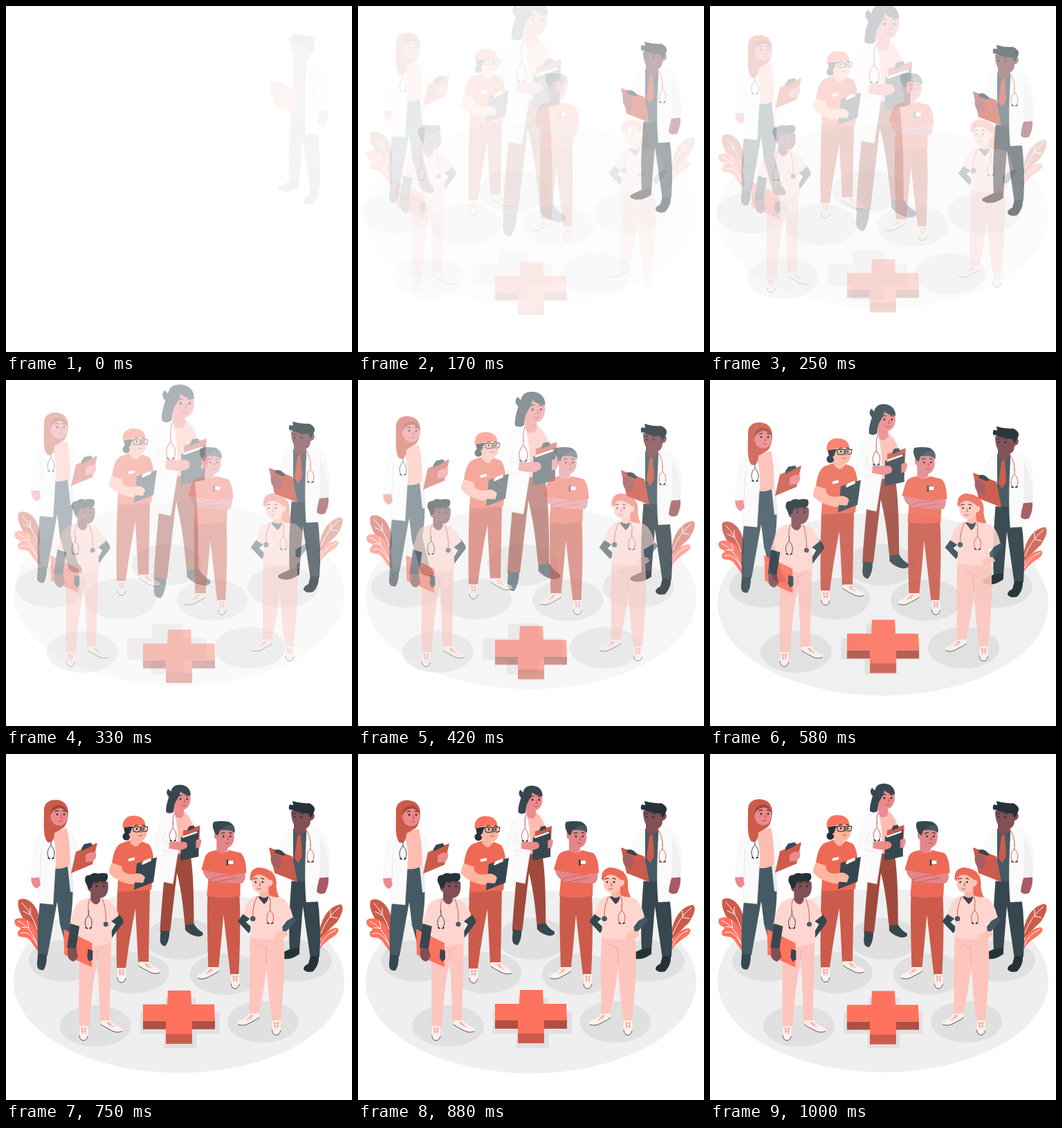
An HTML page for the animation above (1040 ms loop, 500x500 px).

```html
<!DOCTYPE html>
<html lang="en">
<head>
<meta charset="utf-8">
<title>Medical team</title>
<style>
html, body { margin: 0; width: 100%; height: 100%; overflow: hidden; background: #fff; }
svg { display: block; width: 100vw; height: 100vh; }
.line { fill: none; stroke-linecap: round; stroke-linejoin: round; }
.red { fill: #ff725e; } .mid { fill: #ee6a56; } .brick { fill: #cc5b4b; } .rust { fill: #a04a3e; }
.pink { fill: #ffd6cf; } .rose { fill: #fdc5bd; } .blush { fill: #ffbdb1; }
.slate { fill: #455a64; } .dark { fill: #37474f; } .black { fill: #263238; }
.coat { fill: #fafafa; stroke: #ebebeb; stroke-width: .6; } .shade { fill: #ebebeb; }
.brown { fill: #7f5054; } .umber { fill: #a55c64; } .warm { fill: #ec8a8c; } .tan { fill: #e4868b; } .fair { fill: #ffb5a0; }
</style>
</head>
<body>
<svg viewBox="0 0 500 500">
<defs>
  <g id="face">
    <ellipse rx="1.3" ry="1.6" class="black"/><ellipse cx="10" rx="1.3" ry="1.6" class="black"/>
    <path class="line" stroke="#263238" stroke-width="1.1" d="M-3-4Q-1-6 2-5M8-5Q10-6 12-4"/>
    <path class="line" stroke="#a04a3e" stroke-width=".9" d="M6 1L7 5H5M2 9Q5 12 8 9"/>
  </g>
  <g id="front">
    <path fill="#fff0ed" d="M0 0H12V16Q10 22 5 21Q0 20 0 15Z"/>
    <path class="line" stroke="#37474f" stroke-width=".9" d="M0 14Q0 20 5 21Q10 22 12 15"/>
    <path class="line" stroke="#e8644f" stroke-width=".7" d="M4 4H8M4 8H8M3 2L4 11M9 2L8 11"/>
  </g>
  <g id="side">
    <path fill="#fff0ed" d="M0-1H14Q18 6 28 9Q33 12 30 15Q22 18 14 13Q4 8 0 5Z"/>
    <path class="line" stroke="#37474f" stroke-width=".9" d="M0 5Q4 8 14 13Q22 18 30 15"/>
    <path class="line" stroke="#e8644f" stroke-width=".7" d="M9 3L13 2M11 6L15 4M10 2Q12 6 18 8"/>
  </g>
  <g id="scope" class="line">
    <path d="M0-13V-6C-6 0-6 7-3 12M0-6C6 0 6 7 3 12"/>
    <path stroke="#263238" stroke-width="1.8" d="M-4 12L-2 13M4 12L2 13"/>
  </g>
</defs>

<g data-from="0,-30"><ellipse cx="250" cy="327" rx="239" ry="132.5" fill="#efefef"/></g>

<g data-from="-30,0" id="shadows" fill="#e0e0e0">
  <path d="M229 352H273V373H307V404H274V425H227V404H193V373H229Z"/>
</g>

<g data-from="0,-30">
  <path class="brick" d="M46 264C30 246 14 225 18 210C27 203 51 214 49 252Z"/>
  <path class="red" d="M47 284C38 275 36 266 29 264C22 262 18 265 17 258C17 253 22 253 21 250C13 248 11 242 13 238C20 233 32 236 40 246L48 262L50 285Z"/>
  <path class="line" stroke="#fff" d="M23 214Q36 226 45 252M25 226L35 231L35 221M17 240Q34 246 45 273M23 249L33 250L31 240M21 258Q34 252 46 276"/>
</g>
<g data-from="0,-30">
  <path class="brick" d="M452 266C453 240 464 220 483 216C490 218 486 230 478 242Q467 252 452 268Z"/>
  <path class="red" d="M451 286C452 268 458 254 476 250C484 250 480 258 474 262C465 268 456 274 451 286Z"/>
  <path class="line" stroke="#fff" d="M482 220Q464 234 455 258M469 225V234L479 236M477 253Q460 260 454 276"/>
</g>

<g data-from="0,-30" data-quick>
  <path class="dark" d="M413 178L436 178L450 205Q456 250 453 293L440 296L429 220L424 284L410 284C408 250 410 215 413 178Z"/>
  <path class="black" d="M410 282L424 280V289Q412 298 400 296Q388 293 397 288ZM440 292L452 292Q453 304 444 314Q434 317 430 311Q430 306 437 303Z"/>
  <path class="coat" d="M416 105C404 108 400 122 396 137L412 152L412 183L420 184V108Z"/>
  <path class="slate" d="M415 108L434 106L437 185L415 183Z"/>
  <path class="brown" d="M416 98L434 102V111L425 119L416 112Z"/>
  <path class="brick" d="M421 118L426 117L428 148L422 158L417 150Z"/>
  <path class="coat" d="M435 104C452 107 461 112 464 130Q468 150 466 178L452 180L452 213L434 214C431 180 433 140 435 104Z"/>
  <path class="shade" d="M453 120C462 132 467 150 466 178L453 180Q455 150 453 120Z" opacity=".7"/>
  <path class="umber" d="M453 179L466 178Q467 190 461 201Q453 204 449 199L450 191Z"/>
  <path class="brick" d="M380 135L414 148L421 185L388 172Z"/>
  <path class="umber" d="M383 146Q391 143 398 153L397 166L388 164Q381 158 383 146Z"/>
  <path class="dark" d="M388 139Q397 135 404 146L400 147L389 143Z"/>
  <path class="brown" d="M412 82C420 80 434 78 441 84C449 86 446 96 440 96C440 104 436 108 430 108C418 109 412 100 412 82Z"/>
  <path class="black" d="M411 82Q407 78 410 73L415 74L414 68Q426 72 438 71Q449 76 445 84L440 93L437 86Q424 86 411 80Z"/>
  <use href="#face" x="417" y="91"/>
  <use href="#scope" x="440" y="143" stroke="#e8644f"/>
  <path class="line" stroke="#e8644f" d="M433 108Q441 120 440 132"/>
</g>

<g data-from="0,-30">
  <path class="slate" d="M70 160L94 160C98 190 97 215 93 240L104 285L90 288L78 245L74 212L60 290L46 289C45 260 46 235 50 205Z"/>
  <path class="dark" d="M46 288L59 289Q59 305 54 311Q44 312 45 301ZM90 284L103 282Q112 290 109 296Q96 298 90 290Z"/>
  <path class="shade" d="M91 125L98 198L93 198L89 160Z"/>
  <path class="coat" d="M86 107C94 108 99 122 103 135L117 142L113 155L95 160Z"/>
  <path class="blush" d="M63 112L88 106Q94 132 92 160Q80 166 70 164Z"/>
  <path class="coat" d="M58 107C43 113 41 135 36 178L49 177L47 214L68 216L72 150Q72 125 64 110Z"/>
  <path class="line" stroke="#e0e0e0" stroke-width=".8" d="M51 135L49 178"/>
  <path class="warm" d="M36 178L48 177L50 188L45 193Q37 191 36 178Z"/>
  <path class="brick" d="M101 140L132 127L125 158L94 171Z"/>
  <path class="dark" d="M109 135L113 129L123 127L125 131L109 139Z"/>
  <path class="warm" d="M115 145Q122 139 130 141Q132 149 125 154L115 155Z"/>
  <path class="brick" d="M55 82C54 70 62 64 74 65C84 66 90 73 90 84C90 94 86 104 82 106L70 113C70 122 66 128 60 126C53 118 55 98 55 82Z"/>
  <path class="warm" d="M64 88C63 76 72 72 80 74C88 76 90 84 89 91C87 99 82 103 76 102C69 102 65 96 64 88Z"/>
  <path class="rust" d="M64 88C63 76 72 71 80 73C86 75 89 80 89 85Q82 74 73 78Q66 81 64 88Z"/>
  <use href="#face" x="74" y="86"/>
  <use href="#scope" x="65" y="137" stroke="#37474f"/>
</g>

<g data-zoom>
  <path class="rust" d="M236 140L266 140C271 165 272 205 272 248L259 250C256 225 255 205 247 172L237 258L222 259C223 235 226 205 228 180Z"/>
  <path class="dark" d="M223 257L236 258Q236 272 230 280Q222 280 222 270ZM259 249L272 247Q276 255 285 260Q287 266 277 266Q266 264 259 256Z"/>
  <path class="coat" d="M255 81Q270 85 275 104L280 124L262 150Z"/>
  <path class="blush" d="M243 85L258 82Q271 94 272 110L263 144L242 144Z"/>
  <path class="warm" d="M243 68H257V86Q253 95 243 88Z"/>
  <path class="coat" d="M243 82C227 87 222 94 220 104C216 115 212 125 214 135L226 139L221 184L241 188L249 138Q249 105 243 82Z"/>
  <path class="line" stroke="#e0e0e0" stroke-width=".8" d="M229 113L226 125L239 129M226 139L238 140"/>
  <path class="brick" d="M256 110L281 102L279 140L255 145Z"/>
  <path class="dark" d="M263 107L265 103L272 102L273 106L263 110Z"/>
  <path class="dark" d="M253 119L279 109L279 148L252 154Z"/>
  <path class="line" stroke="#fff" stroke-width="2.5" d="M256 119L276 112"/>
  <path class="warm" d="M236 126L254 126Q264 125 262 134Q257 139 247 138L235 136ZM275 124Q283 119 283 126L281 134L275 136Z"/>
  <path class="warm" d="M239 60C246 52 258 50 265 52C269 62 267 74 259 78C250 80 244 76 240 70Z"/>
  <path class="dark" d="M235 60Q229 54 234 48L238 52Q240 41 253 42C264 43 268 52 267 58Q257 57 252 52C250 62 244 66 243 73L242 82Q236 86 231 82Q230 75 235 60Z"/>
  <use href="#face" x="252" y="63"/>
  <use href="#scope" x="241" y="112" stroke="#cc5b4b"/>
  <path class="line" stroke="#cc5b4b" d="M243 84Q240 92 241 100"/>
</g>

<g data-from="0,-30">
  <path class="brick" d="M161 194L208 191Q207 250 206 300H191L187 222Q179 262 173 308H160C159 270 160 230 161 194Z"/>
  <use href="#front" x="161" y="308"/><use href="#side" x="192" y="300"/>
  <path class="mid" d="M166 128L180 123Q186 136 196 125L206 129C211 133 213 145 214 158L210 195L161 198L163 160L153 157C155 143 158 132 166 128Z"/>
  <path class="fair" d="M180 116L193 122V128Q188 138 179 126Z"/>
  <path class="fair" d="M153 156L168 161Q166 169 176 172L196 173Q203 177 198 185L180 187Q160 183 150 172Q147 168 153 156Z"/>
  <path class="dark" d="M189 157L218 148L213 184L185 195Z"/>
  <path fill="#fff" d="M196 157L199 153L209 149L210 153L197 159ZM177 150L186 148V152L177 154Z"/>
  <path class="fair" d="M184 172Q196 169 201 177L198 185L184 184Z"/>
  <circle cx="174" cy="118" r="5.5" class="black"/>
  <path class="fair" d="M177 104L202 101C205 112 203 122 195 125C187 127 180 122 177 114Z"/>
  <path class="black" d="M170 105L183 103L179 114L172 114Z"/>
  <path class="red" d="M169 106C167 92 177 87 186 88C196 88 202 95 201 102Q185 100 169 106Z"/>
  <use href="#face" x="189" y="107"/>
  <path class="line" stroke="#263238" stroke-width="1.1" d="M184 104H194V110Q189 113 184 110ZM196 104H205L204 110Q199 112 196 109ZM177 106L184 105M194 106H196"/>
</g>

<g data-from="-30,0">
  <path class="brick" d="M290 203L336 202C338 240 337 280 335 319H323L313 232Q310 270 306 309L291 308C290 270 289 235 290 203Z"/>
  <use href="#side" transform="translate(306 309)scale(-1 1)"/><use href="#front" x="324" y="318"/>
  <path class="mid" d="M303 139C294 140 288 143 286 150L281 167L292 172L289 205Q313 210 337 205L338 174L346 172C346 160 344 148 338 143L321 139Q313 146 303 139Z"/>
  <path class="tan" d="M303 124L319 132V139Q312 148 303 139Z"/>
  <path class="tan" d="M283 168L295 170Q310 173 325 174L344 172Q346 182 340 187L300 185Q286 182 283 168Z"/>
  <path class="line" stroke="#b55a5a" stroke-width=".8" d="M292 182Q306 175 327 175M300 185L332 179"/>
  <path fill="#fff" d="M317 154H327V159H317Z"/><path class="dark" d="M317 153H320V161H317Z"/>
  <path class="tan" d="M300 114C308 108 320 106 327 110C331 124 326 136 316 136C308 137 304 130 303 124Q298 121 300 114Z"/>
  <path class="dark" d="M301 115Q295 103 299 98Q310 96 321 98Q331 103 329 114Q324 108 308 110L305 118Z"/>
  <path class="slate" d="M309 110Q317 101 327 103Q330 108 329 114Q323 108 309 110Z"/>
  <use href="#face" x="313" y="119"/>
</g>

<g data-from="-30,0">
  <path class="dark" d="M148 240L161 230Q170 240 168 244L150 268V258L157 246Z"/>
  <path class="rose" d="M103 270L151 268C150 310 149 350 148 386L135 388Q133 340 131 295Q122 340 119 395H105C103 350 106 310 103 270Z"/>
  <path class="line" stroke="#e9a297" stroke-width=".8" d="M131 295L130 285L140 279"/>
  <use href="#front" x="105" y="393"/><use href="#side" x="136" y="386"/>
  <path class="pink" d="M119 208C108 210 102 214 99 220L91 246L105 250L103 274Q127 282 152 272L151 242L162 233C158 222 152 214 146 211L135 209Q127 216 119 208Z"/>
  <path class="brown" d="M121 200L135 206V212Q129 223 121 211Z"/>
  <path class="red" d="M82 253L123 273V308L83 290Z"/>
  <path class="dark" d="M117 282L124 284V297L119 300L116 294Z"/>
  <path class="dark" d="M92 245L105 249L101 274L100 282L87 280Z"/>
  <path class="brown" d="M88 280L100 281L103 293L97 300Q88 298 88 290Z"/>
  <path class="brown" d="M117 188C124 180 140 180 146 185C148 198 144 208 135 208C128 208 122 204 121 199Q115 197 117 188Z"/>
  <path class="black" d="M118 195L113 184Q112 174 120 175Q125 170 132 173Q139 171 145 173Q148 181 142 184L125 185L122 194Z"/>
  <use href="#face" x="130" y="191"/>
  <path class="line" stroke="#cc5b4b" d="M120 209Q116 218 118 229M138 209Q144 224 143 242"/>
  <use href="#scope" x="118" y="239" stroke="#37474f"/>
  <circle cx="143" cy="246" r="3.5" class="slate"/>
</g>

<g data-from="30,0">
  <path class="dark" d="M346 228L336 242L352 259L357 251L348 243L356 236Z"/>
  <path class="slate" d="M411 228L421 240L405 258L397 254L407 241L402 234Z"/>
  <path class="rose" d="M354 263L402 262C406 300 402 345 398 386H386Q380 350 378 305Q374 345 366 376H353C354 340 352 300 354 263Z"/>
  <path class="line" stroke="#e9a297" stroke-width=".8" d="M378 305L377 280L365 275"/>
  <use href="#side" transform="translate(367 376)scale(-1 1)"/><use href="#front" x="386" y="385"/>
  <path class="pink" d="M364 205C354 207 350 212 346 226L343 231L355 239L354 265Q378 271 402 265L400 245L416 236C413 222 408 212 400 208L383 205Q374 216 364 205Z"/>
  <path class="dark" d="M365 206L381 204Q380 214 374 217Z"/>
  <path fill="#ffc4b8" d="M388 263Q394 255 405 256L409 261Q402 269 391 268Z"/>
  <path class="mid" d="M354 181Q353 165 368 164Q392 167 392 187Q391 196 396 207Q384 207 380 203Z"/>
  <path class="fair" d="M368 195H381V205Q374 211 368 205Z"/>
  <path fill="#ffc4b8" d="M357 182C360 172 372 172 382 182Q390 182 385 190L381 192C380 199 376 201 370 201C361 200 356 194 357 182Z"/>
  <path class="mid" d="M355 184Q356 173 366 168L372 170Q376 178 384 181L386 170L365 164Q353 168 355 184Z"/>
  <use href="#face" x="362" y="185"/>
  <path class="line" stroke="#cc5b4b" d="M364 206Q357 222 358 234M382 206Q385 214 383 220"/>
  <use href="#scope" x="383" y="232" stroke="#cc5b4b"/>
  <circle cx="358" cy="238" r="3.8" class="slate"/>
</g>

<g data-from="0,30">
  <path fill="#b04f43" d="M198 387H302V399H198Z"/>
  <path class="brick" d="M231 405H269V420H231Z"/>
  <path class="red" d="M234 343H267L268 363H301L302 387H269V406H231V387H198V363H233Z"/>
</g>
</svg>
<script>
const LOOP = 1040, STEPS = 25;
const svg = document.querySelector('svg');
const spots = [[83, 299], [183, 316], [251, 267], [418, 299], [316, 318], [370, 387], [128, 393]];
document.getElementById('shadows').innerHTML +=
  spots.map(([x, y]) => `<ellipse cx="${x}" cy="${y}" rx="51.5" ry="30"/>`).join('');

const cubic = (a, b, s) => 3 * a * s * (1 - s) ** 2 + 3 * b * s * s * (1 - s) + s ** 3;

// cubic-bezier(.36, -.01, .5, 1.38): slight overshoot before settling
function overshoot(x) {
  let lo = 0, hi = 1;
  for (let i = 0; i < 24; i++) {
    const mid = (lo + hi) / 2;
    if (cubic(.36, .5, mid) < x) lo = mid; else hi = mid;
  }
  return cubic(-.01, 1.38, lo);
}
const quickOut = x => 1 - (1 - Math.min(1, x / .7)) ** 2;

const parts = [...svg.querySelectorAll('[data-from], [data-zoom]')].map(el => ({
  el,
  zoom: 'zoom' in el.dataset,
  ease: 'quick' in el.dataset ? quickOut : overshoot,
  from: (el.dataset.from || '0,0').split(',').map(Number)
}));

function draw(now) {
  const step = Math.min(STEPS - 1, Math.floor((now % LOOP + 5) / LOOP * STEPS));
  const x = (step + .5) / STEPS;
  for (const { el, zoom, ease, from } of parts) {
    const p = ease(x), rest = 1 - p;
    el.setAttribute('opacity', Math.max(0, Math.min(1, p)));
    el.setAttribute('transform', zoom
      ? `translate(251 161) scale(${1 + rest / 2}) translate(-251 -161)`
      : `translate(${from[0] * rest} ${from[1] * rest})`);
  }
}
const start = performance.now();
function tick() {
  draw(performance.now() - start);
  requestAnimationFrame(tick);
}
tick();
</script>
</body>
</html>
```
